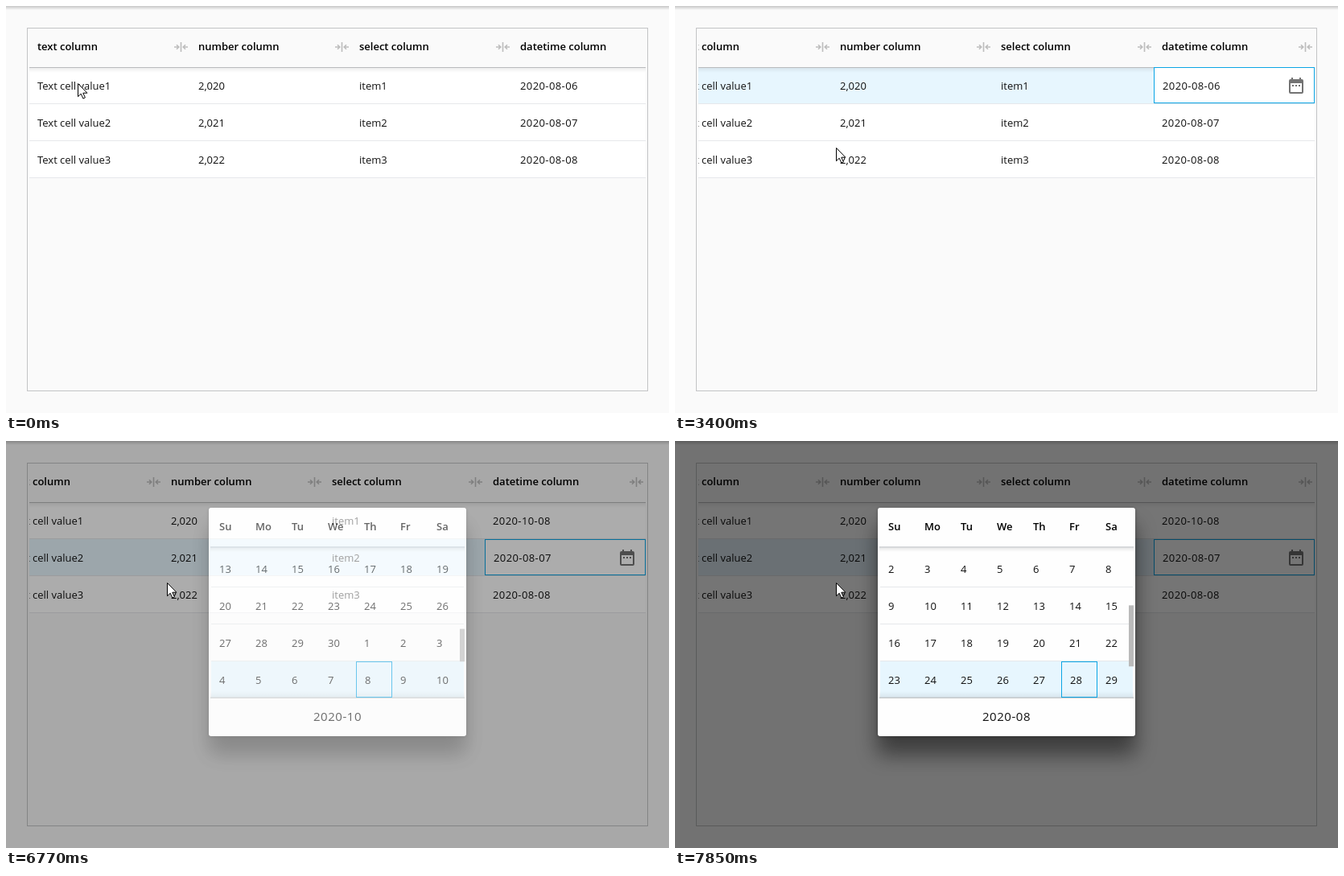
Animation of 824x506 px, one loop 8000 ms. Source, as an HTML page:

```html
<!DOCTYPE html>
<html lang="en">
<head>
<meta charset="utf-8">
<title>Data grid</title>
<style>
html, body { margin: 0; width: 100%; height: 100%; overflow: hidden; background: #fafafa; }
svg { display: block; }
text { font: 400 13px "Open Sans", "Noto Sans", sans-serif; fill: #111; white-space: pre; }
.head { font-weight: 600; fill: #000; }
.date { letter-spacing: .4px; }
.month { font-size: 15px; font-weight: 500; letter-spacing: .55px; text-anchor: middle; }
.line { fill: #e6e8eb; }
.current { fill: none; stroke: #0ba5e5; }
.active { fill: #e7f6fe; }
.icon { fill: #737373; }
.resize { fill: none; stroke: #bdbdbd; stroke-width: 1.6; }
#card { filter: drop-shadow(0 22px 13px rgba(0, 0, 0, .4)) drop-shadow(0 1px 2px rgba(0, 0, 0, .3)); }
</style>
</head>
<body>
<svg width="824" height="506" viewBox="0 0 824 506">
  <defs>
    <linearGradient id="fade" x2="0" y2="1">
      <stop stop-opacity=".2"/><stop offset="1" stop-opacity="0"/>
    </linearGradient>
    <linearGradient id="rise" x2="0" y1="1" y2="0">
      <stop stop-opacity=".07"/><stop offset="1" stop-opacity="0"/>
    </linearGradient>
    <clipPath id="view"><path d="M29 28H795V478H29z"/></clipPath>
  </defs>
  <rect width="824" height="506" fill="#fafafa"/>
  <rect width="824" height="5" fill="url(#fade)"/>
  <rect x="26.5" y="27.5" width="771" height="451" fill="none" stroke="#c3c4c6"/>
  <g id="rows"></g>
  <rect id="rowActive" class="active" x="29" width="766" height="45"/>
  <rect x="29" y="77" width="766" height="6" fill="url(#fade)" opacity=".35"/>
  <rect x="29" y="76" width="766" height="1" fill="#b9bbbd"/>
  <g clip-path="url(#view)"><g id="columns"></g></g>
  <g id="editor">
    <path id="handle" fill="#64b5f6" d="M0 0L7.8 7.8A11 11 0 1 1-7.8 7.8z"/>
    <rect id="caret" x="-1" y="-19" width="2" height="19" fill="#4285f4"/>
  </g>
  <g id="popup">
    <rect width="824" height="506" opacity=".54"/>
    <rect id="card" x="252" y="83" width="320" height="284" rx="3" fill="#fefefe"/>
    <g id="weeks"></g>
    <rect id="weekActive" class="active" x="255" width="314" height="45"/>
    <rect x="254" y="133" width="316" height="5" fill="url(#fade)" opacity=".4"/>
    <rect x="254" y="131" width="316" height="2" fill="#d6d8da"/>
    <rect x="254" y="311" width="316" height="8" fill="url(#rise)"/>
    <rect x="254" y="318.5" width="316" height="1.5" fill="#c6c9cb"/>
    <g id="days"></g>
    <rect id="dayCurrent" class="current" width="44" height="44"/>
    <rect id="thumb" x="564" width="6" fill="#bababa"/>
    <text id="month" class="month" x="412" y="348"></text>
  </g>
  <circle id="click" cx="89" cy="96" r="12" fill="#ff0" opacity=".47"/>
  <path id="cursor" d="M0 0V16.2L3.7 12.7L6.4 18.6L8.9 17.4L6.3 11.7H11.4z" fill="#fff" stroke="#000" stroke-width="1"/>
</svg>
<script>
const LOOP = 8000, DAY = 864e5, ROW = 46;
const $ = id => document.getElementById(id);

function add(parent, tag, attrs, text) {
  const el = document.createElementNS("http://www.w3.org/2000/svg", tag);
  set(el, attrs);
  if (text) el.textContent = text;
  return parent.appendChild(el);
}
function set(el, attrs) {
  for (const k in attrs) el.setAttribute(k, attrs[k]);
}
function show(el, on) { el.style.display = on ? "" : "none"; }
function write(el, text) { if (el.textContent !== text) el.textContent = text; }

// Value of the last [time, value] entry that has been reached.
function step(t, keys) {
  let value = keys[0][1];
  for (const [at, v] of keys) if (t >= at) value = v;
  return value;
}
function ramp(t, a, b) { return Math.min(1, Math.max(0, (t - a) / (b - a))); }

// Grid
const columns = $("columns");
const cells = [0, 1, 2].map(r => {
  const y = 76 + ROW * r;
  add($("rows"), "rect", { x: 29, y, width: 766, height: 45, fill: "#fff" });
  add($("rows"), "rect", { x: 29, y: y + 45, width: 766, height: 1, class: "line" });
  return [];
});
const cellBox = add(columns, "rect", { class: "current", width: 199, height: 44 });
["text", "number", "select", "datetime"].forEach((name, c) => {
  const x = 39 + 200 * c;
  add(columns, "text", { class: "head", x, y: 55 }, name + " column");
  add(columns, "path", {
    class: "resize", transform: `translate(${x + 178.5} 51)`,
    d: "M0-6V6M-8.5 0H-3M-5.5-2.8L-2.7 0L-5.5 2.8M8.5 0H3M5.5-2.8L2.7 0L5.5 2.8"
  });
  cells.forEach((row, r) => {
    const value = ["Text cell value" + (r + 1), "2,02" + r, "item" + (r + 1), "2020-08-0" + (r + 6)][c];
    row.push(add(columns, "text", { class: c === 3 ? "date" : "", x, y: 104 + ROW * r }, value));
  });
});
const dropIcon = add(columns, "path", { class: "icon", transform: "translate(594 87)", d: "M7 10l5 5 5-5z" });
const dateIcon = add(columns, "path", {
  class: "icon", "fill-rule": "evenodd",
  d: "M7 11h2v2H7zM11 11h2v2h-2zM15 11h2v2h-2zM19 4h-1V2h-2v2H8V2H6v2H5a2 2 0 0 0-2 2v14a2 2 0 0 0 2 2h14a2 2 0 0 0 2-2V6a2 2 0 0 0-2-2zM19 20H5V9h14z"
});

// Calendar
const days = [];
["Su", "Mo", "Tu", "We", "Th", "Fr", "Sa"].forEach((name, c) =>
  add($("days"), "text", { class: "head", x: 265 + 45 * c, y: 111 }, name));
for (let i = 0; i < 28; i++)
  days.push(add($("days"), "text", { y: 164 + ROW * (i / 7 | 0) }));
for (let r = 0; r < 3; r++)
  add($("weeks"), "rect", { x: 255, y: 181 + ROW * r, width: 314, height: 1, class: "line" });

function drawGrid(t) {
  const row = t < 380 ? -1 : t < 6770 ? 0 : 1;
  const col = step(t, [[0, 0], [2240, 1], [2620, 2], [3400, 3]]);
  const editing = t >= 1310;
  const top = 76 + ROW * row;

  show($("rowActive"), row >= 0);
  show(cellBox, row >= 0);
  if (row >= 0) {
    set($("rowActive"), { y: top });
    set(cellBox, { x: 29.5 + 200 * col, y: top + .5, fill: editing ? "#fff" : "none" });
    cellBox.style.fill = editing ? "#fff" : "none";
  }
  cells.forEach((line, r) => line.forEach((cell, c) =>
    set(cell, { x: 39 + 200 * c + (r === row && c === col ? 1 : 0) })));
  write(cells[0][3], t < 6770 ? "2020-08-06" : "2020-10-08");

  set(columns, { transform: `translate(${t < 3400 ? 0 : -34} 0)` });
  show(dropIcon, col === 2);
  show(dateIcon, col === 3);
  set(dateIcon, { transform: `translate(794 ${top + 11})` });

  show($("editor"), editing && col < 2);
  set($("editor"), { transform: `translate(${col ? 275 : 134} 108)` });
  const start = col ? 2240 : 1310;
  set($("handle"), { opacity: ramp(t, start, start + 240) });
  show($("caret"), col || (t >= 1390 && t < 1860));
}

function drawCalendar(t) {
  const alpha = step(t, [
    [0, 0], [4090, .98], [4260, 1], [6770, .6], [6850, .25], [6920, 0],
    [7380, .45], [7460, .75], [7530, .95], [7610, 1]
  ]);
  show($("popup"), alpha);
  if (!alpha) return;
  set($("popup"), { opacity: alpha });

  const week = step(t, [
    [0, 1], [4810, 2], [4960, 3], [5130, 4], [5360, 5], [5520, 6], [5670, 7],
    [5750, 8], [5900, 9], [6130, 10], [7380, 1], [7610, 2], [7780, 3], [7850, 4]
  ]);
  const col = t < 7000 ? 4 : 5;
  const first = Math.max(0, week - 3);
  const line = week - first;
  const dateAt = n => new Date(Date.UTC(2020, 6, 26) + n * DAY);

  days.forEach((el, i) => {
    const c = i % 7, current = c === col && (i / 7 | 0) === line;
    set(el, { x: 265 + 45 * c + (current ? 1 : 0) });
    write(el, String(dateAt(first * 7 + i).getUTCDate()));
  });
  set($("weekActive"), { y: 136 + ROW * line });
  set($("dayCurrent"), { x: 255.5 + 45 * col, y: 136.5 + ROW * line });

  const month = dateAt(week * 7 + col).toISOString().slice(0, 7);
  write($("month"), month);

  // The list grows as later months are loaded.
  const total = { "08": 9.64, "09": 13.5, "10": 18 }[month.slice(5)];
  const visible = t < 4810 ? ramp(t, 4080, 4260)
    : t < 5130 ? 1 - ramp(t, 4810, 4960)
    : t < 7000 ? ramp(t, 5090, 5360)
    : ramp(t, 7380, 7610);
  set($("thumb"), {
    y: 136 + 183 * (first + 2.6) / total, height: 183 * 4 / total, opacity: visible
  });
}

function drawCursor(t) {
  const p = ramp(t, 340, 620), e = p * p * (3 - 2 * p);
  set($("cursor"), { transform: `translate(${89.5 + 111 * e} ${96.5 + 80 * e})` });
  show($("click"), t >= 210 && t < 380);
}

const began = performance.now();
function frame() {
  const t = (performance.now() - began) % LOOP;
  drawGrid(t);
  drawCalendar(t);
  drawCursor(t);
  requestAnimationFrame(frame);
}
frame();
</script>
</body>
</html>
```
